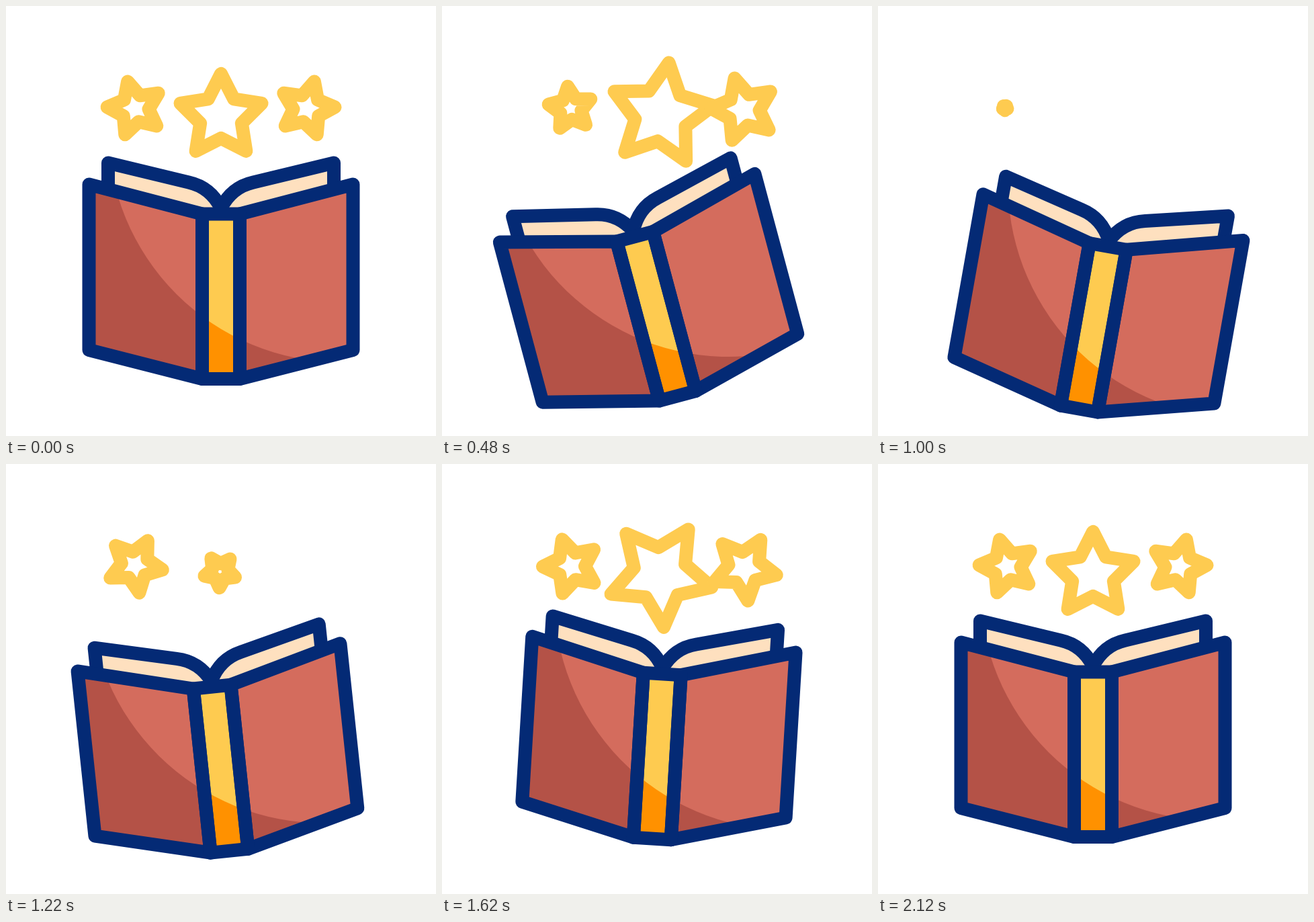
Write an HTML page with a canvas that moves like this. It is 640 px wide and 640 px high and loops after 2400 ms.

```html
<!DOCTYPE html>
<html lang="en">
<head>
<meta charset="utf-8">
<title>Book and stars</title>
<style>
  html, body { margin: 0; width: 100%; height: 100%; overflow: hidden; background: #fff; }
  canvas { display: block; width: 100vw; height: 100vh; }
</style>
</head>
<body>
<canvas id="stage"></canvas>
<script>
const SIZE = 640, LOOP = 2400, END = 2120, STEP = 20, LINE = 20;
const NAVY = '#042a75', YELLOW = '#fecb50', ORANGE = '#ff9100';
const RED = '#d46c5d', DARK_RED = '#b45247', CREAM = '#fee0bf';

const canvas = document.getElementById('stage');
const ctx = canvas.getContext('2d');
const ratio = window.devicePixelRatio || 1;
canvas.width = canvas.height = SIZE * ratio;

const rad = deg => deg * Math.PI / 180;

// Smooth curve through [time, value] keys, flat at peaks and at both ends.
function curve(keys) {
  const n = keys.length;
  const grad = i => (keys[i + 1][1] - keys[i][1]) / (keys[i + 1][0] - keys[i][0]);
  const slopes = keys.map((_, i) => {
    if (i === 0 || i === n - 1) return 0;
    const a = grad(i - 1), b = grad(i);
    return a * b <= 0 ? 0 : 2 * a * b / (a + b);
  });
  return t => {
    if (t <= keys[0][0]) return keys[0][1];
    if (t >= keys[n - 1][0]) return keys[n - 1][1];
    let i = 0;
    while (t > keys[i + 1][0]) i++;
    const [t0, v0] = keys[i], [t1, v1] = keys[i + 1];
    const h = t1 - t0, u = (t - t0) / h, w = 1 - u;
    return v0 * w * w * (1 + 2 * u) + v1 * u * u * (3 - 2 * u)
      + h * u * w * (slopes[i] * w - slopes[i + 1] * u);
  };
}

// Book: six equal bounces and a decaying swing.
const bounces = [0, 55, -35, 52.5, -20.5, 16.3, 0];
const lift = t => {
  const x = Math.min(t / END, 1) * (bounces.length - 1);
  const i = Math.min(Math.floor(x), bounces.length - 2);
  const e = (1 - Math.cos(Math.PI * (x - i))) / 2;
  return bounces[i] + (bounces[i + 1] - bounces[i]) * e;
};
const swing = curve([[0, 0], [400, -18], [480, -15], [700, 3.93], [885, 15.3],
  [1000, 10.06], [1290, -8], [1440, -4.08], [1660, 4], [1820, 2.84], [END, 0]]);

// Stars: shrink away after a short swell, then return the same way.
const leave = {
  scale: curve([[0, 1], [160, 1.169], [320, 1.228], [372, 1.265],
    [480, 0.8], [540, 0.489], [635, 0]]),
  spin: curve([[0, 0], [160, -30.8], [300, -64.5], [380, -56.2],
    [480, 7.9], [540, 31.2], [640, 48]])
};
const arrive = {
  scale: curve([[0, 1], [160, 1.169], [220, 1.265], [255, 1.28], [380, 1.142],
    [540, 0.63], [660, 0.085], [675, 0]]),
  spin: curve([[0, 0], [160, -30.8], [220, -44.3], [310, -62],
    [380, -53.9], [540, 21.7], [680, 50]])
};
const stars = [
  { x: 189, y: 151.5, dx: 3, dy: 1, r: 41.5, inner: 0.495, tip: -105.2, delay: 0 },
  { x: 320, y: 158.5, dx: 0, dy: 6, r: 63.6, inner: 0.51, tip: -90, delay: 160 },
  { x: 451, y: 151.5, dx: -3, dy: 1, r: 41.5, inner: 0.495, tip: -74.8, delay: 320 }
];

function drawStar(star, t) {
  const out = t - star.delay;
  const left = 1660 + star.delay - t;
  const phase = out < 650 ? leave : arrive;
  const p = Math.max(0, out < 650 ? out : left);
  const s = phase.scale(p);
  if (s <= 0.002) return;
  ctx.save();
  ctx.translate(star.x, star.y);
  ctx.rotate(rad(phase.spin(p)));
  ctx.translate(star.dx * s, star.dy * s);
  ctx.beginPath();
  for (let i = 0; i < 10; i++) {
    const a = rad(star.tip + i * 36);
    const r = star.r * s * (i % 2 ? star.inner : 1);
    ctx.lineTo(r * Math.cos(a), r * Math.sin(a));
  }
  ctx.closePath();
  ctx.strokeStyle = YELLOW;
  ctx.stroke();
  ctx.restore();
}

function polygon(points) {
  const path = new Path2D();
  points.forEach(([x, y]) => path.lineTo(x, y));
  path.closePath();
  return path;
}

const cover = polygon([[123.5, 265.5], [292, 309.5], [292, 555], [123.5, 512]]);
const coverRight = polygon([[516.5, 265.5], [348, 309.5], [348, 555], [516.5, 512]]);
const spine = polygon([[292, 309.5], [348, 309.5], [348, 555], [292, 555]]);
const page = new Path2D('M152 270V233.5L272 262.5C292 267 309 279 320 301');
const pageFill = new Path2D('M152 270V233.5L272 262.5C292 267 309 279 320 301L292 309.5Z');
const light = new Path2D();
light.arc(499.3, 183, 347.5, 0, 2 * Math.PI);

function drawPage() {
  ctx.fillStyle = CREAM;
  ctx.fill(pageFill);
  ctx.stroke(page);
}

function panel(shape, lit, shade) {
  ctx.save();
  ctx.clip(shape);
  ctx.fillStyle = shade;
  ctx.fill(shape);
  ctx.fillStyle = lit;
  ctx.fill(light);
  ctx.restore();
}

function drawBook(t) {
  ctx.save();
  ctx.translate(320, 437 + lift(t));
  ctx.rotate(rad(swing(t)));
  ctx.translate(-320, -437);
  ctx.strokeStyle = NAVY;
  drawPage();
  ctx.save();
  ctx.translate(SIZE, 0);
  ctx.scale(-1, 1);
  drawPage();
  ctx.restore();
  panel(cover, RED, DARK_RED);
  panel(coverRight, RED, DARK_RED);
  panel(spine, YELLOW, ORANGE);
  [cover, coverRight, spine].forEach(shape => ctx.stroke(shape));
  ctx.restore();
}

function draw(t) {
  ctx.setTransform(ratio, 0, 0, ratio, 0, 0);
  ctx.fillStyle = '#fff';
  ctx.fillRect(0, 0, SIZE, SIZE);
  ctx.lineWidth = LINE;
  ctx.lineJoin = ctx.lineCap = 'round';
  drawBook(t);
  stars.forEach(star => drawStar(star, t));
}

const start = performance.now();
function tick() {
  const t = (performance.now() - start) % LOOP;
  draw(Math.min(END, Math.floor(t / STEP) * STEP));
  requestAnimationFrame(tick);
}
tick();
</script>
</body>
</html>
```
